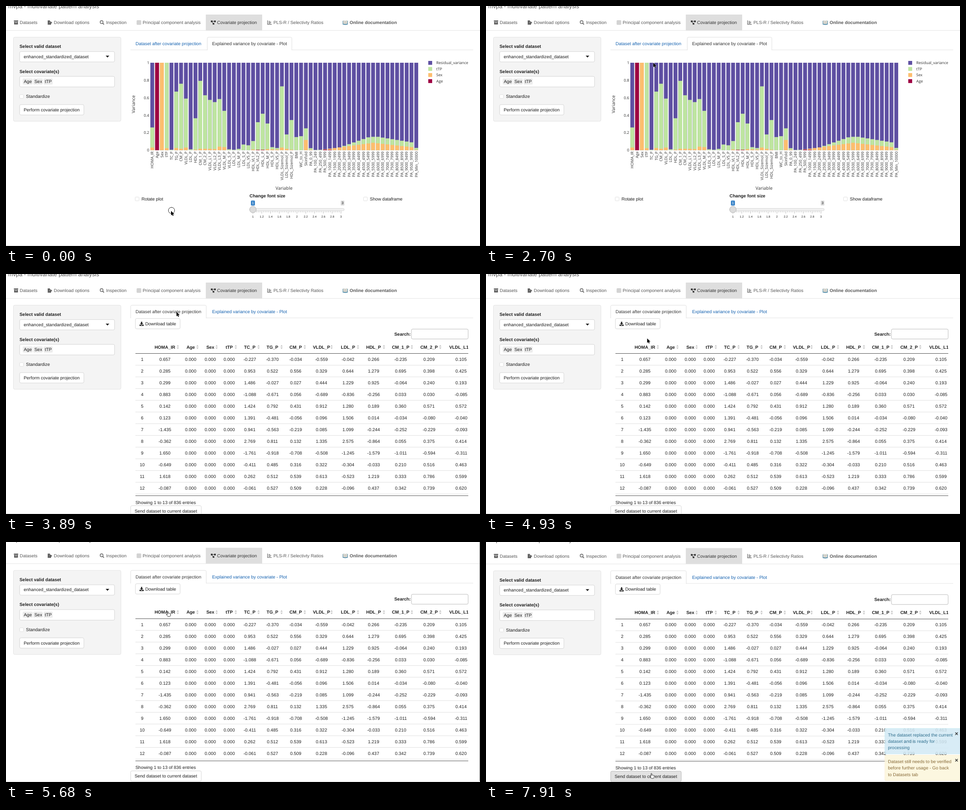
These frames come from a looping animation (1051 px wide and 533 px high, 8 s). An HTML page:

```html
<!DOCTYPE html>
<html lang="en">
<head>
<meta charset="utf-8">
<title>Covariate projection</title>
<style>
html, body { margin: 0; width: 100%; height: 100%; overflow: hidden; background: #fff; }
svg { display: block; width: 1051px; height: 533px; }
text { font: 9.93px "Liberation Sans", Arial, sans-serif; fill: #1e1e1e; text-rendering: geometricPrecision; white-space: pre; }
.b { font-weight: bold; }
.nav { fill: #585858; }
.link { fill: #1562b0; }
.mid { text-anchor: middle; }
.end { text-anchor: end; }
.tick { font-size: 6.4px; }
.tag { font-size: 7.8px; }
.plot text { font-family: "Open Sans", sans-serif; font-size: 8.53px; fill: #303030; }
.plot .axis { font-size: 9.95px; }
.info text { fill: #31708f; }
.warn text { fill: #8a6d3b; }
.note .close { font-size: 13px; font-weight: bold; fill: #333; }

#page, #plotTab, #tableTab, #cursor, #arrow, #hand, #ring, #tabBg, #tabText, #download, #send, #notes, #bar {
  animation: 8s step-end infinite;
}
#page { animation-name: scroll; }
#plotTab { animation-name: plotTab; }
#tableTab { animation-name: tableTab; }
#cursor { animation-name: move; }
#arrow { animation-name: arrow; }
#hand { animation-name: hand; }
#ring { animation-name: ring; }
#tabBg { animation-name: tabBg; }
#tabText { animation-name: tabText; }
#download { animation-name: download; }
#send { animation-name: send; }
#notes { animation-name: notes; }
#bar { animation-name: bar; }

@keyframes move {
  0% { transform: translate(366px, 455px); }
  1.875% { transform: translate(356px, 450px); }
  3.75% { transform: translate(322px, 437px); }
  5.625% { transform: translate(304px, 431px); }
  18.75% { transform: translate(317px, 430.5px); }
  20.625% { transform: translate(338px, 434px); }
  26.25% { transform: translate(352px, 290px); }
  28.125% { transform: translate(364px, 162px); }
  31.875% { transform: translate(367px, 150px); }
  33.75% { transform: translate(371px, 126px); }
  35.625% { transform: translate(375px, 102px); }
  37.5% { transform: translate(377px, 89px); }
  39.25% { transform: translate(378px, 84px); }
  52.375% { transform: translate(375px, 93px); }
  54.25% { transform: translate(370px, 109px); }
  56.125% { transform: translate(364px, 125px); }
  58% { transform: translate(360px, 136px); }
  59.875% { transform: translate(358px, 141px); }
  61.625% { transform: translate(357.3px, 143px); }
  67.25% { transform: translate(357.3px, 146px); }
  69.125% { transform: translate(357.5px, 151px); }
  71% { transform: translate(358px, 154px); }
  72.875% { transform: translate(358.5px, 180px); }
  74.75% { transform: translate(360px, 235px); }
  76.625% { transform: translate(362px, 310px); }
  78.5% { transform: translate(363px, 400px); }
  80.25% { transform: translate(364px, 473px); }
  82.125%, 100% { transform: translate(366px, 513.5px); }
}
@keyframes scroll {
  0% { transform: translateY(0); }
  63.5% { transform: translateY(-4px); }
  65.375% { transform: translateY(-7.5px); }
  67.25% { transform: translateY(-7.2px); }
  69.125% { transform: translateY(-6.7px); }
  71% { transform: translateY(-6.2px); }
  72.875% { transform: translateY(-5.9px); }
  74.75% { transform: translateY(-5.7px); }
  76.625%, 100% { transform: translateY(-5.5px); }
}
@keyframes plotTab { 0% { visibility: visible; } 48.625%, 100% { visibility: hidden; } }
@keyframes tableTab { 0% { visibility: hidden; } 48.625%, 100% { visibility: visible; } }
@keyframes hand {
  0% { opacity: 0; } 37.5% { opacity: 1; } 48.625% { opacity: 0; }
  54.25% { opacity: 1; } 56.125% { opacity: 0; }
  71% { opacity: 1; } 72.875% { opacity: 0; } 82.125%, 100% { opacity: 1; }
}
@keyframes arrow {
  0% { opacity: 1; } 37.5% { opacity: 0; } 48.625% { opacity: 1; }
  54.25% { opacity: 0; } 56.125% { opacity: 1; }
  71% { opacity: 0; } 72.875% { opacity: 1; } 82.125%, 100% { opacity: 0; }
}
@keyframes ring {
  0% { opacity: 1; } 1.875% { opacity: 0; } 46.75% { opacity: 1; }
  48.625% { opacity: 0; } 97% { opacity: 1; } 98.875%, 100% { opacity: 0; }
}
@keyframes tabBg { 0% { opacity: 0; } 37.5%, 100% { opacity: 1; } }
@keyframes tabText { 0% { fill: #1562b0; } 37.5%, 100% { fill: #1c4670; } }
@keyframes download { 0% { fill: #fff; } 54.25% { fill: #e6e6e6; } 56.125%, 100% { fill: #fff; } }
@keyframes send { 0% { fill: #fff; stroke: #ccc; } 82.125%, 100% { fill: #e2e2e2; stroke: #adadad; } }
@keyframes notes { 0% { opacity: 0; } 98.875%, 100% { opacity: 1; } }
@keyframes bar { 0% { opacity: 0; } 63.5% { opacity: 1; } 89.5% { opacity: .45; } 91.375%, 100% { opacity: 0; } }
</style>
</head>
<body>
<svg id="stage" viewBox="0 0 1051 533"></svg>
<script>
const text = (x, y, s, cls = '', attrs = '') => `<text x="${x}" y="${y}" class="${cls}" ${attrs}>${s}</text>`;
const rect = (x, y, w, h, fill, attrs = '') => `<rect x="${x}" y="${y}" width="${w}" height="${h}" fill="${fill}" ${attrs}/>`;
const path = (d, attrs) => `<path d="${d}" ${attrs}/>`;
const box = (x, y, w, h, stroke = '#ccc', attrs = '') => rect(x, y, w, h, '#fff', `stroke="${stroke}" stroke-width=".8" rx="2.8" ${attrs}`);
const line = (x1, y, x2, color, w = .8) => path(`M${x1} ${y}H${x2}`, `stroke="${color}" stroke-width="${w}"`);
const check = (x, y, label) => rect(x, y, 8.4, 8.4, '#fff', 'stroke="#d9d9d9" stroke-width=".8" rx="1.3"') + text(x + 14, y + 7.4, label);
const range = (n, f) => Array.from({ length: n }, (_, i) => f(i)).join('');

function header() {
  const ink = 'fill="#606060"', thin = 'fill="none" stroke="#606060"';
  const icons =
    path('M17.5 32h9.5v2.6h-9.5zM18 35.3h8.5v5.7H18zM20.5 36.4v1h3.5v-1z', ink + ' fill-rule="evenodd"') +
    path('M92.5 32h5v2.5H100v1.6h-4v1.6h4V41.5h-7.5zM99.5 34.6l3 2.4-3 2.4v-1.6h-3v-1.6h3z', ink) +
    `<circle cx="212" cy="35.7" r="3.2" ${thin} stroke-width="1.4"/>` + path('M214.3 38.1L217.3 41.2', thin + ' stroke-width="1.7"') +
    path('M290.5 32.5h8.5v8.5h-8.5zM290.5 35.3h8.5M290.5 38.2h8.5M293.3 32.5v8.5M296.2 32.5v8.5', 'fill="none" stroke="#999" stroke-width=".7"') +
    path('M454.3 32.3h3.6v3.6h-3.6zM461.5 32.3h3.6v3.6h-3.6zM458.3 37.7h3.6v3.6h-3.6z', 'fill="#333"') +
    path('M457 34h5M456.5 35l3 4', 'stroke="#333"') +
    path('M580 32v8.7h9.2M582.3 34h3.5M582.3 36.2h5.8M582.3 38.4h4.3', thin + ' stroke-width="1.2"') +
    path('M746.5 33l5.7 1 5.7-1v8l-5.7 1-5.7-1z', 'fill="#3f83a8"') +
    path('M747.5 32.5q3-.8 4.7 1 1.7-1.8 4.7-1v7.3q-3-.7-4.7.9-1.7-1.6-4.7-.9z', 'fill="#e9e6dc" stroke="#9aa" stroke-width=".4"') +
    path('M752.2 33.5v7.2M748.5 35h2.5M748.5 37h2.5M753.4 35h2.5M753.4 37h2.5', 'stroke="#888" stroke-width=".5"');
  const items = [[30.5, 'Datasets'], [106, 'Download options'], [222, 'Inspection'], [303, 'Principal component analysis'],
    [593, 'PLS-R / Selectivty Ratios']];
  return text(5, 5.2, 'mvpa - multivariate pattern analysis', '', 'style="font-size:12.8px;fill:#555"') +
    rect(443, 19, 125, 35, '#dedede') + line(0, 54.3, 1051, '#dedede') + icons +
    items.map(([x, s]) => text(x, 40, s, 'nav')).join('') +
    text(468, 40, 'Covariate projection', '', 'style="fill:#333"') + text(762, 40, 'Online documentation', 'nav b');
}

function sidebar() {
  const chips = [[37, 22, 'Age'], [60.5, 20.8, 'Sex'], [83.5, 20, 'tTP']];
  return rect(16.5, 69.3, 238.3, 186.7, '#f4f4f4', 'stroke="#dedede" stroke-width=".8" rx="2.8"') +
    text(30, 93, 'Select valid dataset', 'b') + box(30.3, 101.2, 210.4, 23) + text(39.3, 115.7, 'enhanced_standardized_dataset') +
    path('M221 110.3h8l-4 4.3z', 'fill="#222"') +
    text(30, 148.7, 'Select covariate(s)', 'b') + box(30.3, 156.3, 210.4, 23.5) +
    chips.map(([x, w, s]) => rect(x, 161, w, 13.5, '#ececec', 'rx="2"') + text(x + 2.5, 171.3, s)).join('') +
    check(30.3, 196.8, 'Standardize') + box(30.3, 219, 142.4, 23) + text(39.2, 233.8, 'Perform covariate projection');
}

const activeTab = (x, w) => line(276, 97.5, 1036, '#ddd') +
  path(`M${x} 98.2V72q0-2.7 2.7-2.7h${w - 5.4}q2.7 0 2.7 2.7V98.2`, 'fill="#fff" stroke="#d8d8d8" stroke-width=".8"');
const tabNames = ['Dataset after covariate projection', 'Explained variance by covariate - Plot'];

// name, explained %, sex %, age %
const groups = `HOMA_IR 26 3,Age 100 100 100,Sex 100 100,tTP 100 2.3,TC_P .5,TG_P 67 2.5,CM_P 76 1.6,VLDL_P 59 3,
LDL_P 1,HDL_P 36.5 .6,CM_1_P 79.3 1.6,CM_2_P 62.8 1.6,VLDL_L1_P 57.5 1.6,VLDL_L2_P 55 1.3,
VLDL_L3_P 58.5 4,VLDL_M_P 45 3.5,VLDL_S_P 1,LDL_L_P .5,LDL_M_P 1.5,LDL_S_P 6.5,LDL_VS_P 5.6,
HDL_VL1_P 10.5 .8,HDL_VL2_P 32 .5 .4,HDL_L_P 41.7 .5 .4,HDL_M_P 30.5 1.3,HDL_S_P 3.5 1,HDL_VS_P 2.5 .8,
VLDL_Sizemol_P 73 3,LDL_Sizemol_P 18 1.6,HDL_Sizemol_P 34.5 .5,BMI 15,WC_to_H 16,Skinfold 25 11.7,
PA_0_99 2.3 .5,PA_100_249 .3,PA_250_499 .5,PA_500_999 1 1 .7`
  .split(',').map(s => { const [n, ...v] = s.trim().split(' '); return [n, ...v.map(Number)]; });
for (let i = 0; i < 18; i++) {
  const from = 1000 + 500 * i;
  const rise = i < 2 ? 1.7 + .5 * i : 3 + 1.95 * (i - 2);
  const sex = i < 9 ? 1.7 + .75 * i : 8.5 - .625 * (i - 9);
  groups.push([`PA_${from}_${from + 499}`, Math.min(rise, 15.3, 15.3 - .9 * (i - 10)), sex, i ? 0 : .5]);
}
groups.push(['PA_Min_10000', 2.6, .5]);

function chart() {
  const colors = ['#5e4fa2', '#bee5a0', '#fdbe6e', '#9e0142'];
  const base = 320.2, unit = 1.942, step = 10.643;
  const bars = groups.map(([name, total, sex = 0, age = 0], i) => {
    const x = 319 + step * (i + .5);
    return [100, total, sex, age].map((v, k) => v ? rect(x - step * .4, base - v * unit, step * .8, v * unit, colors[k]) : '').join('') +
      `<text class="end" transform="translate(${x + 3} 323) rotate(-90)">${name}</text>`;
  }).join('');
  return '<g class="plot">' + bars +
    range(6, i => text(317.5, base + 3 - i * 38.84, +(i * .2).toFixed(1), 'end')) +
    ['Residual_variance', 'tTP', 'Sex', 'Age'].map((s, i) =>
      rect(936.3, 122 + 13.5 * i, 8.6, 8.6, colors[i]) + text(954, 129.3 + 13.5 * i, s)).join('') +
    '<text class="axis mid" transform="translate(286 218) rotate(-90)">Variance</text>' +
    text(616.5, 407.8, 'Variable', 'axis mid') + '</g>';
}

function slider() {
  const tick = 3.906;
  return text(540, 425, 'Change font size', 'b') +
    rect(540, 449.5, 210, 5.2, '#f1f1f1', 'stroke="#ccc" stroke-width=".7" rx="2.5"') +
    range(51, i => path(`M${547.5 + tick * i} 455.3v${i % 5 ? 3 : 5.5}`, 'stroke="#999" stroke-width=".7"')) +
    range(11, i => text(547.5 + tick * 5 * i, 470, +(1 + i * .2).toFixed(1), 'tick mid')) +
    '<circle cx="547.5" cy="452" r="7.3" fill="#dcdcdc" stroke="#aaa" stroke-width=".8"/>' +
    rect(543, 432, 9, 11.3, '#3d86c9', 'rx="2"') + text(547.5, 440.4, '1', 'tag mid', 'style="fill:#fff"') +
    rect(742, 432, 8.5, 11.3, '#dedede', 'rx="2"') + text(746.2, 440.4, '3', 'tag mid');
}

const plotPanel = () => activeTab(446.3, 187.5) +
  rect(276.5, 69.3, 167.5, 28, '#e9e9e9', 'id="tabBg" rx="2.5"') +
  text(287.3, 87.2, tabNames[0], '', 'id="tabText"') + text(457, 87.2, tabNames[1], '', 'style="fill:#333"') +
  chart() + check(286.5, 424.3, 'Rotate plot') + slider() + check(792.8, 424.3, 'Show dataframe');

const rows = `0.657 -0.227 -0.370 -0.034 -0.559 -0.042 0.266 -0.235 0.209 0.105
0.285 0.953 0.522 0.556 0.329 0.644 1.279 0.695 0.398 0.425
0.299 1.486 -0.027 0.027 0.444 1.229 0.925 -0.064 0.240 0.193
0.883 -1.088 -0.671 0.056 -0.689 -0.836 -0.256 0.033 0.030 -0.085
0.142 1.424 0.792 0.431 0.912 1.280 0.189 0.360 0.571 0.572
0.123 1.391 -0.481 -0.056 0.096 1.506 0.014 -0.034 -0.080 -0.040
-1.435 0.941 -0.563 -0.219 0.085 1.099 -0.244 -0.252 -0.229 -0.093
-0.362 2.769 0.811 0.132 1.335 2.575 -0.864 0.055 0.375 0.414
1.650 -1.761 -0.918 -0.708 -0.508 -1.245 -1.579 -1.011 -0.594 -0.311
-0.649 -0.411 0.485 0.316 0.322 -0.304 -0.033 0.210 0.516 0.463
1.618 0.262 0.512 0.539 0.613 -0.523 1.219 0.333 0.786 0.599
-0.087 -0.061 0.527 0.509 0.228 -0.096 0.437 0.342 0.739 0.620`.split('\n').map(r => r.split(' '));

function grid() {
  const cols = [352.3, 409.5, 453, 495, 540.5, 590.8, 642.3, 699.5, 758.3, 815, 875, 938, 1009];
  const sorts = [381, 424.5, 467, 509.5, 560, 611, 662.5, 722, 780.5, 838, 900, 963];
  const names = ['HOMA_IR', 'Age', 'Sex', 'tTP', 'TC_P', 'TG_P', 'CM_P', 'VLDL_P', 'LDL_P', 'HDL_P', 'CM_1_P', 'CM_2_P'];
  const body = rows.map(([first, ...rest], i) => {
    const y = 192.8 + 26 * i;
    return [first, '0.000', '0.000', '0.000', ...rest].map((v, k) => text(cols[k], y, v, 'mid')).join('') +
      text(302, y, i + 1, 'mid') + line(287, y + 9.7, 1025, '#d9d9d9');
  }).join('');
  return '<g clip-path="url(#clip)">' + names.map((s, i) => text(cols[i], 165.6, s, 'b mid')).join('') +
    sorts.map(x => path(`M${x - 2.5} 161.3h5l-2.5-4zM${x - 2.5} 162.9h5l-2.5 4z`, 'fill="#c9c9c9"')).join('') +
    text(982.7, 165.6, 'VLDL_L1_P', 'b') + body + line(287, 176.5, 1025, '#222') + line(287, 492.3, 1025, '#222') + '</g>';
}

const tablePanel = () => activeTab(276.5, 167.5) +
  text(287.3, 87.2, tabNames[0], '', 'style="fill:#333"') + text(457, 87.2, tabNames[1], 'link') +
  box(287, 98.8, 99, 23, '#ccc', 'id="download"') +
  path('M299.3 106h2.8v3.5h2.3l-3.7 3.7-3.7-3.7h2.3zM296 112.5h2.5l2.2 2 2.2-2h2.5v2.7H296z', 'fill="#222"') +
  text(308.7, 113.8, 'Download table') + text(861, 136.5, 'Search:', 'b') + box(899, 122.3, 125.7, 22, '#aaa') + grid() +
  text(287, 510.7, 'Showing 1 to 13 of 836 entries') +
  box(276.5, 514.5, 156.5, 23, '#ccc', 'id="send"') + text(285.2, 529.6, 'Send dataset to current dataset');

const note = (kind, y, fill, stroke, lines) => `<g class="note ${kind}">` +
  rect(884.3, y, 170, 56.7, fill, `stroke="${stroke}" stroke-width=".8" rx="2" opacity=".87"`) +
  lines.map((s, i) => text(891.3, y + 18 + 14.1 * i, s)).join('') + text(1043.3, y + 15.5, '×', 'close mid') + '</g>';

const pointer = () => '<g id="cursor">' +
  '<circle id="ring" cx="1" cy="-1" r="6.9" fill="none" stroke="#222"/>' +
  path('M0 0V10L2.3 7.9 3.8 11.3 5.5 10.6 4 7.3H7.2Z', 'id="arrow" fill="#000" stroke="#fff" stroke-width=".8" paint-order="stroke"') +
  path('M-.2 1Q.8-.8 1.8 1V4.4Q2.8 3.4 3.6 4.6Q4.6 3.8 5.4 5Q6.6 4.4 7 5.8V8.2Q7 11.5 4.6 11.5H1.8Q.4 11.5-.6 9.6L-2.6 6.8Q-2.8 5.2-1.2 6L-.2 7.2Z',
    'id="hand" fill="#fff" stroke="#111" stroke-width=".9"') + '</g>';

document.getElementById('stage').innerHTML =
  '<clipPath id="clip"><rect x="287" y="150" width="738" height="345"/></clipPath>' +
  `<g id="page">${header()}${sidebar()}<g id="plotTab">${plotPanel()}</g><g id="tableTab">${tablePanel()}</g></g>` +
  '<g id="notes">' +
  note('info', 414, '#d3eaf5', '#bce8f1', ['The dataset replaced the current', 'dataset and is ready for', 'processing']) +
  note('warn', 473.3, '#fcf6dc', '#faebcc', ['Dataset still needs to be verified', 'before further usage - Go back', 'to Datasets tab']) + '</g>' +
  rect(1050, 0, 1, 531, '#777', 'id="bar"') + rect(0, 532, 1051, 1, '#d8d8d8') + pointer();
</script>
</body>
</html>
```
